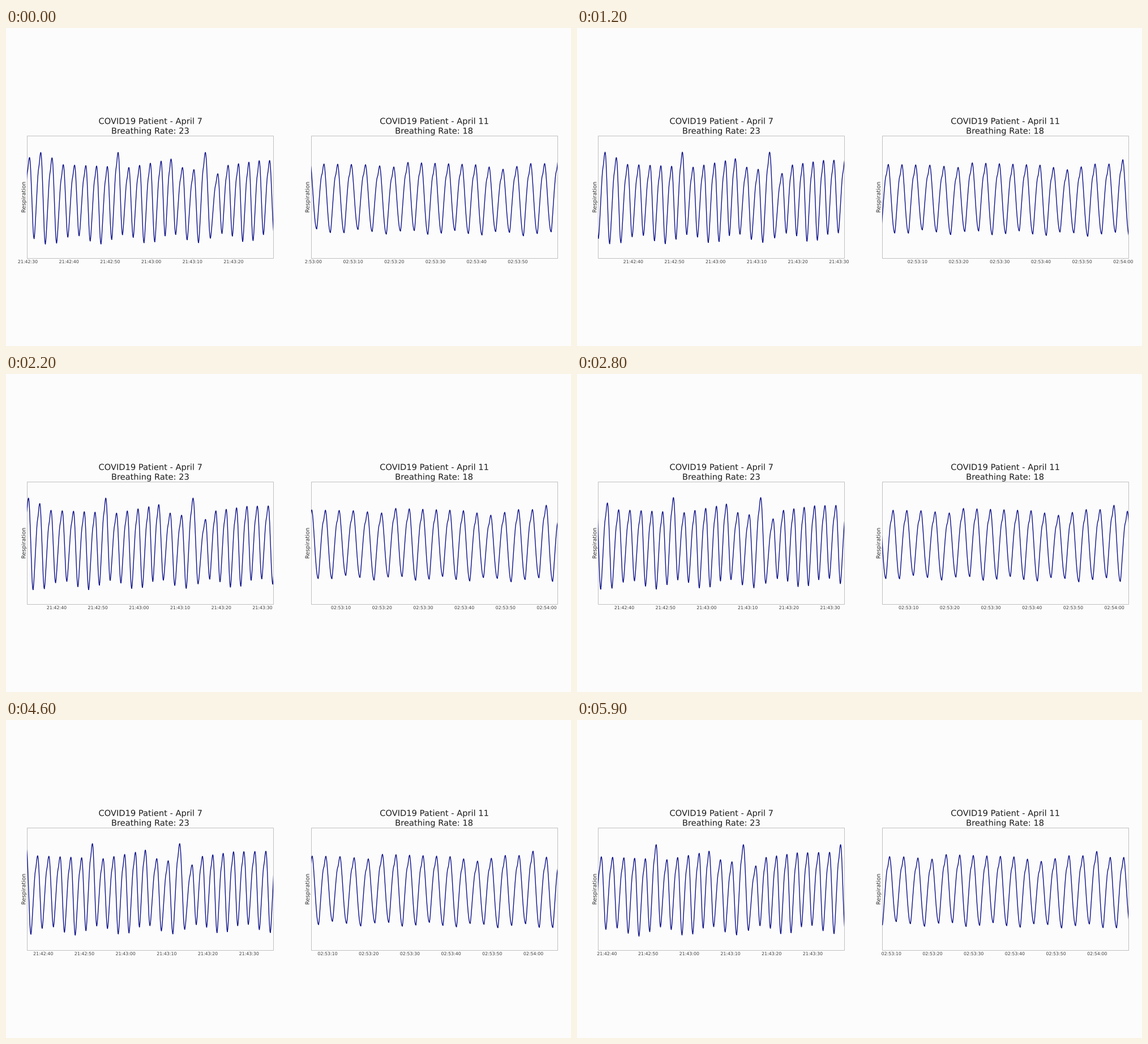
These frames come from a looping animation (998x561 px, 6 s). A matplotlib script:

```python
import numpy as np
import matplotlib.pyplot as plt
from matplotlib.animation import FuncAnimation
from matplotlib.patches import PathPatch, Rectangle
from matplotlib.textpath import TextPath
from matplotlib.transforms import Affine2D

W, H, DPI = 998, 561, 64
PT = 72 / DPI  # points per pixel
FRAMES, INTERVAL = 60, 100
TOP, BOTTOM = 189.5, 405.5
PAPER, NAVY, FRAME_GREY = "#fcfcfc", "#10148a", "#c0c0c0"


def ease(u):
    return (1 - np.cos(np.pi * u)) / 2


def breath_signal(first, runs, calm, trough, rise_power, dent, fall_power, fall_share):
    """Chain breaths: each falls from its peak, then rises to the next one.

    runs holds (count, spacing) pairs; calm and trough give levels by breath number.
    """
    gaps = np.concatenate([[gap] * count for count, gap in runs])
    peaks = first + np.concatenate([[0], np.cumsum(gaps)])
    u = np.linspace(0, 1, 16, endpoint=False)
    fall = ease(u ** fall_power)
    rise = ease(u ** rise_power) - dent * np.exp(-((u - 0.77) / 0.12) ** 2)
    xs, ys = [], []
    for i, gap in enumerate(gaps):
        down, low = fall_share * gap, trough(i)
        xs += [peaks[i] + u * down, peaks[i] + down + u * (gap - down)]
        ys += [calm(i) + fall * (low - calm(i)), low + rise * (calm(i + 1) - low)]
    return np.concatenate(xs), np.concatenate(ys)


def wave(i, period, crest):
    return np.cos(2 * np.pi * (i - crest) / period)


def fast_peak(i):
    # Deep breaths come 7, 8, then 9 breaths apart
    if i in [2 + 7 * k + k * (k - 1) // 2 for k in range(4)]:
        return 219.5
    return np.interp(i, [0, 3, 4, 10, 14, 15, 18, 19, 22, 25],
                     [228, 229, 241, 246, 231, 246, 257, 242, 234, 233])


def slow_peak(i):
    return np.interp(i, [0, 5, 7, 8, 13, 15, 17, 18, 19, 20],
                     [239, 241, 245, 237, 241, 249, 239, 239, 231.5, 242])


def clock(seconds):
    return f"{seconds // 3600:02d}:{seconds // 60 % 60:02d}:{seconds % 60:02d}"


class Label:
    """Text outline centred on x, with its baseline on y."""

    def __init__(self, ax, text, size, color, x=0, y=0, angle=0):
        path = TextPath((0, 0), text, size=size, prop={"family": "DejaVu Sans"})
        box = path.get_extents()
        self.ax, self.angle = ax, angle
        self.half = (box.x0 + box.x1) / 2
        self.patch = ax.add_patch(PathPatch(path, fc=color, lw=0, zorder=3))
        self.place(x, y)

    def place(self, x, y):
        move = Affine2D().translate(-self.half, 0).rotate_deg(self.angle)
        self.patch.set_transform(move.scale(1, -1).translate(x, y) + self.ax.transData)


class Panel:
    def __init__(self, ax, left, right, title, rate, signal, speed, start, tick_x,
                 clip_left=0):
        self.left, self.right = left, right
        self.x, self.y = signal
        self.speed, self.tick_x = speed, tick_x
        mid = (left + right) / 2

        ax.add_patch(Rectangle((left, TOP), right - left, BOTTOM - TOP, fill=False,
                               ec=FRAME_GREY, lw=PT, zorder=1))
        Label(ax, title, 14.65, "#1c1c1c", mid, 169.3)
        Label(ax, f"Breathing Rate: {rate}", 14.65, "#1c1c1c", mid, 186.5)
        Label(ax, "Respiration", 9.75, "#303030", left - 3.1, 298.4, 90)

        window = Rectangle((left, BOTTOM), right - left, TOP - BOTTOM,
                           transform=ax.transData)
        self.line, = ax.plot([], [], color=NAVY, lw=1.4 * PT, solid_joinstyle="round",
                             zorder=2)
        self.line.set_clip_path(window)

        strip = Rectangle((clip_left, H), W - clip_left, -H, transform=ax.transData)
        self.ticks = []
        for k in range(8):
            label = Label(ax, clock(start + 10 * k), 7.85, "#404040")
            label.patch.set_clip_path(strip)
            mark, = ax.plot([], [], color=FRAME_GREY, lw=0.8 * PT)
            self.ticks.append((label, mark))
        self.rest = self.mean(0)

    def mean(self, shift):
        xs = np.linspace(self.left, self.right, 1500) + shift
        return np.interp(xs, self.x, self.y).mean()

    def draw(self, frame):
        shift = self.speed * frame
        # The signal stays centred on the mean of the visible window
        self.line.set_data(self.x - shift, self.y - self.mean(shift) + self.rest)
        for k, (label, mark) in enumerate(self.ticks):
            x = self.tick_x + 72.7 * k - shift
            seen = self.left <= x <= self.right
            label.patch.set_visible(seen)
            mark.set_visible(seen)
            label.place(x, 414.9)
            mark.set_data([x, x], [BOTTOM, BOTTOM + 1.6])


fig = plt.figure(figsize=(W / DPI, H / DPI), dpi=DPI, facecolor=PAPER)
ax = fig.add_axes([0, 0, 1, 1])
ax.set_xlim(0, W)
ax.set_ylim(H, 0)
ax.axis("off")

fast = breath_signal(
    21.6, [(6, 19.9), (7, 19), (1, 17.5), (3, 20.2), (1, 22), (5, 18.3), (4, 19.4)],
    fast_peak, lambda i: 375 - 0.25 * i + 8 * wave(i, 4.5, 2.4),
    rise_power=0.75, dent=0.06, fall_power=1, fall_share=0.41)

slow = breath_signal(
    513.3, [(4, 24.2), (4, 25), (6, 23.9), (5, 24.5), (3, 23.8)],
    slow_peak, lambda i: 358 + 0.3 * i + 4 * wave(i, 3.4, 2.5),
    rise_power=0.7, dent=0.07, fall_power=0.85, fall_share=0.47)

panels = [
    Panel(ax, 37.5, 472.5, "COVID19 Patient - April 7", 23, fast, 0.987,
          21 * 3600 + 42 * 60 + 30, 38.5),
    Panel(ax, 538.8, 973.8, "COVID19 Patient - April 11", 18, slow, 0.98,
          2 * 3600 + 53 * 60, 540.4, clip_left=528),
]


def update(frame):
    for panel in panels:
        panel.draw(frame)


anim = FuncAnimation(fig, update, frames=FRAMES, interval=INTERVAL, repeat=True,
                     repeat_delay=0, init_func=lambda: update(0))
plt.show()
```
